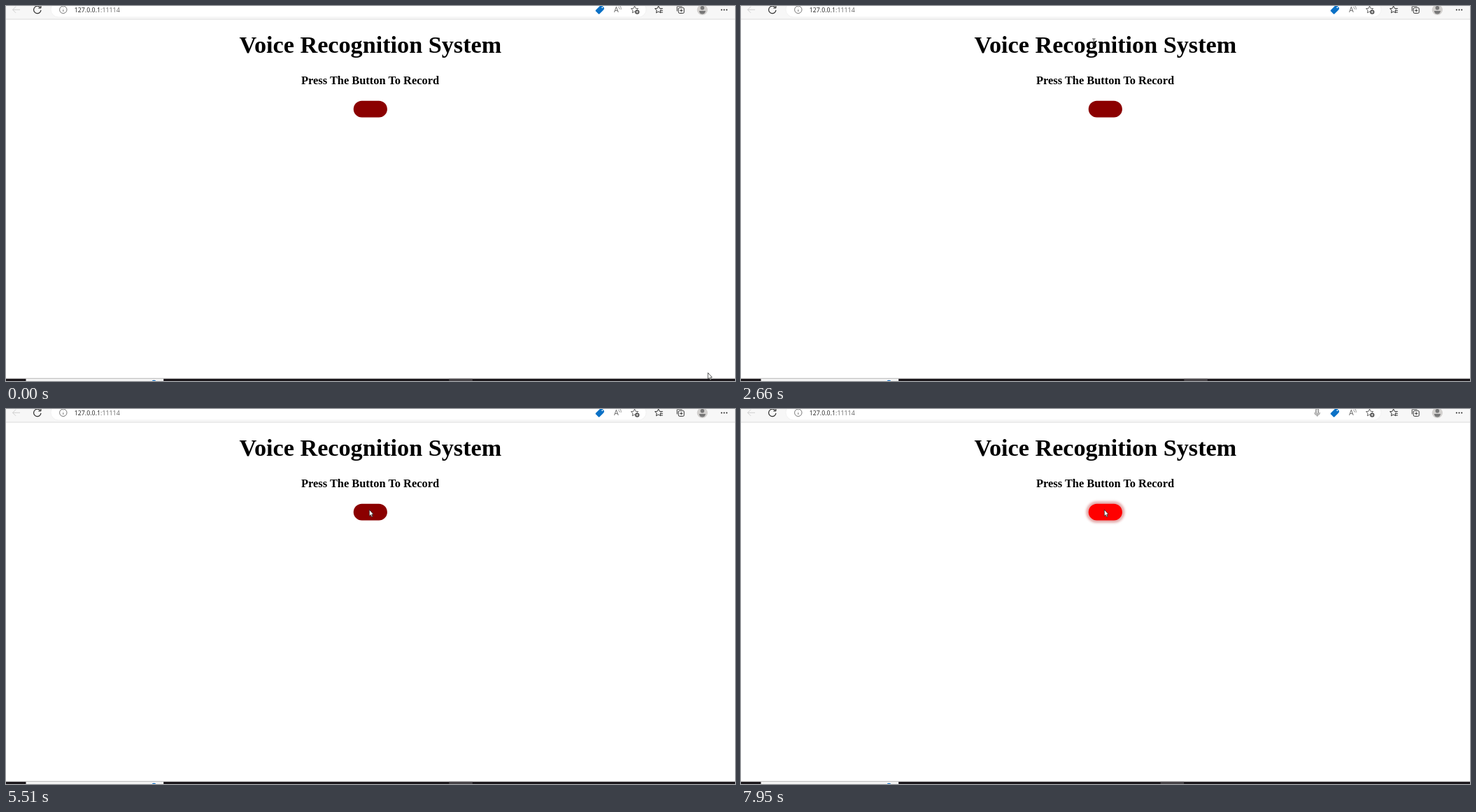
An HTML page with a canvas that plays this animation: 1042x537 px, repeating every 8000 ms.

```html
<!DOCTYPE html>
<html lang="en">
<head>
<meta charset="utf-8">
<title>Voice Recognition System</title>
<style>
  html, body { margin: 0; width: 100%; height: 100%; overflow: hidden; background: #fff; }
  svg, canvas { position: absolute; left: 0; top: 0; width: 1042px; height: 537px; }
  .serif { font-family: "Liberation Serif", "Times New Roman", serif; font-weight: bold; text-anchor: middle; }
  .ui { font-family: "Open Sans", "Noto Sans", sans-serif; }
</style>
</head>
<body>
<svg viewBox="0 0 1042 537">
  <!-- toolbar -->
  <rect width="1042" height="19" fill="#f7f7f7"/>
  <rect x="64" y="-6" width="851" height="22" rx="11" fill="#fff" stroke="#ececec" stroke-width=".7"/>
  <rect y="18.5" width="1042" height="1" fill="#dcdcdc"/>
  <text class="ui" x="97.7" y="8.7" font-size="8.85" fill="#222">127.0.0.1<tspan fill="#666">:11114</tspan></text>
  <text class="ui" x="869" y="9.4" font-size="10.5" fill="#666">A</text>

  <!-- page -->
  <text class="serif" x="520.8" y="67.3" font-size="34.2">Voice Recognition System</text>
  <text class="serif" x="520.6" y="111.6" font-size="16.4">Press The Button To Record</text>

  <!-- taskbar -->
  <rect y="532.6" width="1042" height="1.2" fill="#d9d9d9"/>
  <rect y="533.8" width="1042" height="4" fill="#1b171b"/>
  <rect x="28.5" y="533.8" width="196.7" height="4" fill="#f4f4f4"/>
  <ellipse cx="211.5" cy="537" rx="2.6" ry="1.3" fill="#1673c8"/>
</svg>
<canvas id="stage" width="1042" height="537"></canvas>
<script>
const ctx = document.getElementById("stage").getContext("2d");
const LOOP = 8000, STEP = 69.6, TAU = 2 * Math.PI;
const FOCUS = 5770, BUSY_END = 5900, RECORD = 6040, MIC = 6110;
const PULSE_START = 6075, PULSE = 1500, SPREAD = 8.8;
const BUTTON = { x: 496.7, y: 135.7, w: 48.2, h: 23.9 };

// turning points of the pointer: time, x, y
const PATH = [
  [20, 1003, 525], [225, 737, 313], [510, 737, 313], [1330, 438, 107],
  [1480, 496, 182], [1760, 424, 80], [2110, 379, 44], [2255, 353, 47],
  [3070, 654, 56], [3569, 425, 98], [3850, 500, 104], [4404, 615, 108],
  [4680, 626, 111], [5510, 519, 144]
];

const clamp = v => Math.max(0, Math.min(1, v));
const mix = (a, b, k) => a + (b - a) * k;
const sampled = t => Math.floor((t - 6) / STEP) * STEP + 20;
const within = (v, mid, half) => Math.abs(v - mid) < half;
const overText = (x, y) =>
  within(x, 520.5, 187) && within(y, 55.5, 19.5) || within(x, 520.5, 99.5) && within(y, 106, 9.5);

function pen(color, width) {
  ctx.strokeStyle = color;
  ctx.lineWidth = width;
}

function line(x0, y0, x1, y1) {
  ctx.beginPath();
  ctx.moveTo(x0, y0);
  ctx.lineTo(x1, y1);
  ctx.stroke();
}

function arc(x, y, r, from = 0, to = TAU) {
  ctx.beginPath();
  ctx.arc(x, y, r, from, to);
  ctx.stroke();
}

function disc(x, y, r, color) {
  ctx.fillStyle = color;
  ctx.beginPath();
  ctx.arc(x, y, r, 0, TAU);
  ctx.fill();
}

function box(x, y, w, h, r) {
  ctx.beginPath();
  ctx.roundRect(x, y, w, h, r);
}

function plus(x, y, r) {
  line(x - r, y, x + r, y);
  line(x, y - r, x, y + r);
}

function star(x, y) {
  ctx.beginPath();
  for (let i = 0; i < 10; i++) {
    const r = i % 2 ? 2.6 : 5.4, a = i * TAU / 10;
    ctx.lineTo(x + r * Math.sin(a), y - r * Math.cos(a));
  }
  ctx.closePath();
  ctx.stroke();
}

function drawNavigation() {
  pen("#cfcfcf", 1);
  line(9.5, 5.3, 20, 5.3);
  for (const s of [-1, 1]) line(9.5, 5.3, 14, 5.3 + s * 4.5);
  pen("#333", 1.2);
  arc(44.8, 5.4, 5.2, .1, TAU - .6);
  line(49.9, -.6, 49.9, 2.9);
  line(46.4, 2.9, 49.9, 2.9);
  pen("#666", .9);
  arc(81.8, 5.3, 5.2);
  line(81.8, 5, 81.8, 8);
  line(81.8, 2.5, 81.8, 3.1);
}

function drawTag() {
  ctx.save();
  ctx.translate(849, 5.3);
  ctx.rotate(-Math.PI / 4);
  ctx.fillStyle = "#0b71c6";
  box(-5.8, -3.8, 12, 7.6, [1.2, 3, 3, 1.2]);
  ctx.fill();
  ctx.restore();
  disc(852.3, 2.2, .9, "#fff");
}

function drawActions() {
  pen("#666", .7);
  for (const r of [3.2, 5.6]) arc(873.5, 4, r, -1.1, .2);
  pen("#555", .9);
  star(898.5, 5.4);
  disc(902.2, 8.6, 3.2, "#555");
  pen("#fff", .8);
  plus(902.2, 8.6, 1.7);

  pen("#333", 1);
  star(932.6, 5.4);
  for (let i = 0; i < 3; i++) {
    const y = 3.6 + 2.7 * i;
    pen("#f7f7f7", 3);
    line(936.5, y, 940, y);
    pen("#333", 1);
    line(935.6, y, 938.8, y);
  }

  box(961.2, 2.4, 8, 8, 1.6);
  ctx.stroke();
  line(959.2, .7, 959.2, 7.4);
  line(959.7, .2, 966.5, .2);
  plus(965.2, 6.4, 2);

  disc(995.3, 5.5, 7.6, "#d2d0ce");
  disc(995.3, 2.8, 2.8, "#777");
  box(990.8, 7, 9, 4.5, [0, 0, 4.5, 4.5]);
  ctx.fill();
  for (let i = 0; i < 3; i++) disc(1022.8 + 3.7 * i, 5.5, 1, "#222");
}

function drawMic() {
  ctx.fillStyle = "#d8d8d8";
  pen("#777", .9);
  box(821.6, -.5, 4, 7.6, 2);
  ctx.fill();
  ctx.stroke();
  arc(823.6, 5, 3.8, 0, TAU / 2);
  line(823.6, 8.8, 823.6, 10.8);
}

function pointerAt(t) {
  let i = 0;
  while (i < PATH.length - 2 && t > PATH[i + 1][0]) i++;
  const [t0, x0, y0] = PATH[i], [t1, x1, y1] = PATH[i + 1];
  const k = clamp((t - t0) / (t1 - t0));
  return [mix(x0, x1, k), mix(y0, y1, k)];
}

function drawArrow() {
  const shape = new Path2D("M.3 .2V9.3L2.3 7.5L3.7 10.6L5.1 10L3.8 7L6.2 6.7Z");
  pen("#222", .75);
  ctx.fillStyle = "#fff";
  ctx.fill(shape);
  ctx.stroke(shape);
}

function drawBeam() {
  pen("#444", .9);
  line(0, -4.5, 0, 4.5);
  for (const y of [-4.5, 4.5]) line(-2.3, y, 2.3, y);
}

function drawBusy(t) {
  const a = t / 130;
  pen("#1583d0", 2.4);
  arc(0, 0, 6.2);
  pen("#7fd3f7", 2.4);
  arc(0, 0, 6.2, a, a + 2);
}

function drawPointer(t) {
  const [x, y] = pointerAt(sampled(t));
  ctx.save();
  ctx.translate(x, y);
  if (t >= FOCUS && t < BUSY_END) drawBusy(t);
  else if (overText(x, y)) drawBeam();
  else drawArrow();
  ctx.restore();
}

function pill(grow, shift) {
  const { x, y, w, h } = BUTTON;
  box(x - grow + shift, y - grow, w + 2 * grow, h + 2 * grow, h / 2 + grow);
  ctx.fill();
}

// widens until 65% of the pulse, has faded out at 90%
function drawHalo(t) {
  const k = Math.max(0, t - PULSE_START) % PULSE / PULSE;
  const alpha = .33 * clamp((.9 - k) / .25);
  ctx.save();
  ctx.shadowColor = `rgba(173,0,0,${alpha})`;
  ctx.shadowBlur = 3.4;
  ctx.shadowOffsetX = 2000;
  ctx.fillStyle = "#000";
  pill(SPREAD * clamp(k / .65), -2000);
  ctx.restore();
}

function drawButton(t) {
  const on = t >= RECORD;
  if (on) drawHalo(sampled(t));
  ctx.fillStyle = on ? "#f00" : "#8b0000";
  pill(0, 0);
}

function render(t) {
  ctx.clearRect(0, 0, 1042, 537);
  drawNavigation();
  drawTag();
  drawActions();
  if (t >= MIC) drawMic();
  ctx.fillStyle = "#474347";
  ctx.fillRect(t < FOCUS ? 633.3 : 599.6, 533.8, 33.5, 4);
  drawButton(t);
  drawPointer(t);
}

const start = performance.now();
function frame() {
  render((performance.now() - start) % LOOP);
  requestAnimationFrame(frame);
}
frame();
</script>
</body>
</html>
```
